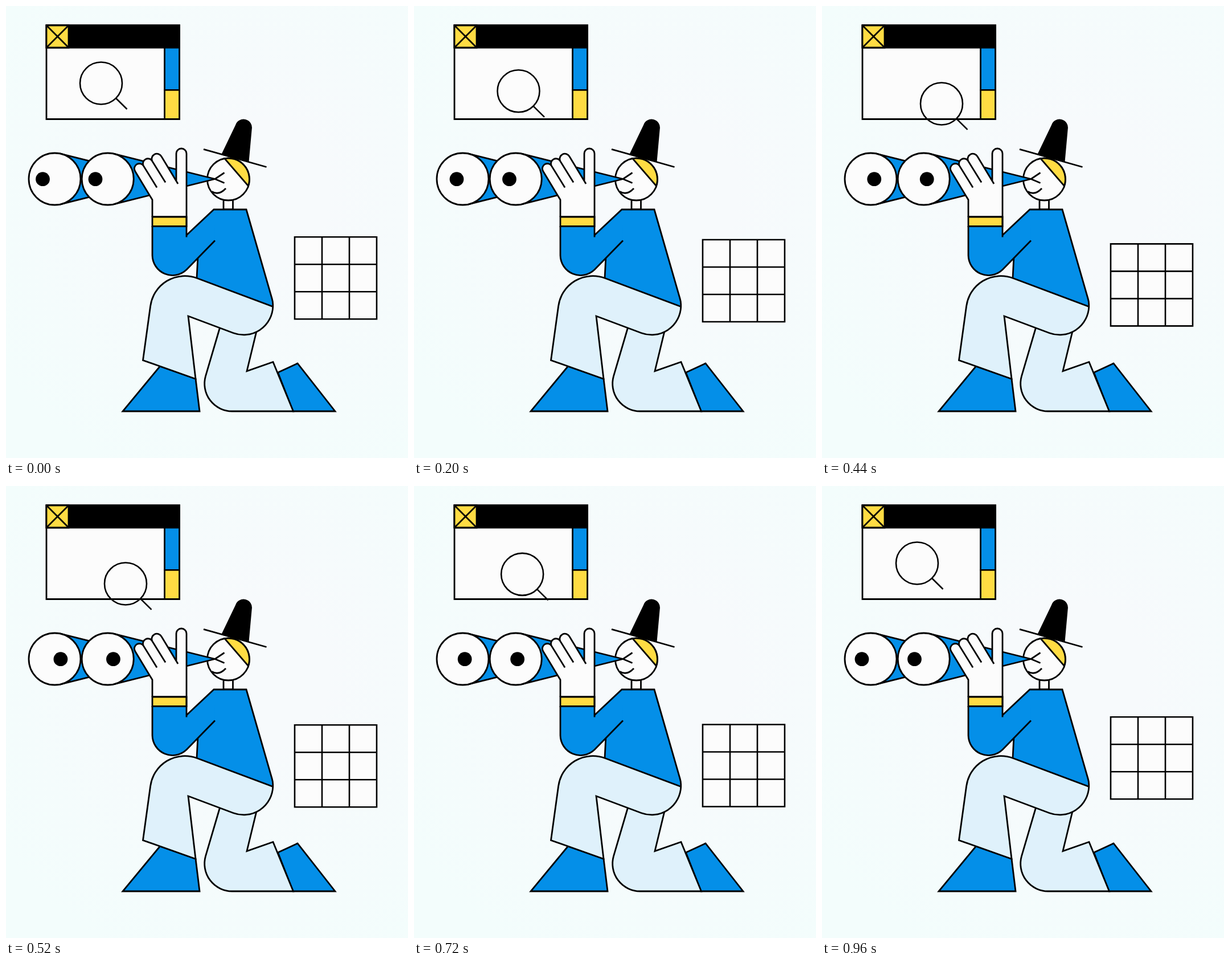
An HTML page for the animation above (1000 ms loop, 706 px wide and 793 px high).

```html
<!DOCTYPE html>
<html lang="en">
<head>
<meta charset="utf-8">
<title>Lookout</title>
<style>
  html, body { margin: 0; width: 100%; height: 100%; overflow: hidden; }
  body { background: radial-gradient(circle at 62% 42%, #f7fafc 20%, #f3fdfc 85%); }
  svg { display: block; width: 100%; height: 100%; }
  .ink { stroke: #000; stroke-width: 2.8; fill: none; }
  .white { fill: #fcfcfc; }
  .blue { fill: #048fe8; }
  .pale { fill: #dff1fb; }
  .yellow { fill: #ffdc43; }
  .flat { stroke: none; }
</style>
</head>
<body>
<svg viewBox="0 0 706 793" class="ink">
  <!-- browser window -->
  <path class="white" d="M71 34H304.5V198.5H71Z"/>
  <path fill="#000" d="M71 34H304.5V73H71Z"/>
  <path class="yellow" d="M71 34H110V73H71Z"/>
  <path d="M72 35L109 72M109 35L72 72"/>
  <path class="blue" d="M278.5 73H304.5V147.3H278.5Z"/>
  <path class="yellow" d="M278.5 147.3H304.5V198.5H278.5Z"/>
  <g id="lens" stroke-width="2.6">
    <circle cx="167" cy="135.5" r="37"/>
    <path d="M193.2 162L212.5 181"/>
  </g>

  <!-- grid -->
  <g id="grid" stroke-width="2.6">
    <path class="white" d="M507 405.3h144v144h-144Z"/>
    <path d="M555 405.3v144M603 405.3v144M507 453.3h144M507 501.3h144"/>
  </g>

  <!-- head and hat -->
  <path class="white" d="M382 330V357H398.5V330"/>
  <circle class="white" cx="390.5" cy="304" r="37"/>
  <path class="yellow" d="M384 267.6A37 37 0 0 1 425.5 315.7Z"/>
  <path d="M347 251.3L457.5 282.5"/>
  <path fill="#000" class="flat" d="M378 261L403 209A14.8 14.8 0 0 1 431.7 216L426.5 273.5Z"/>
  <path d="M361.5 325.5Q374 333 386 320"/>

  <!-- binoculars -->
  <path class="blue" d="M96.5 259.4L273.5 303.5L96.5 347.6Z"/>
  <circle class="white" cx="85.5" cy="303.5" r="45.5"/>
  <path class="blue" d="M190 259.4L367 303.5L190 347.6Z" stroke-linejoin="bevel"/>
  <circle class="white" cx="178.7" cy="303.5" r="45.5"/>
  <path d="M383.5 292.5L367 303.5L383.5 310.5"/>
  <g id="pupils" fill="#000" stroke="none">
    <circle cx="64.5" cy="303.7" r="12.4"/>
    <circle cx="157" cy="303.7" r="12.4"/>
  </g>

  <!-- back leg -->
  <path class="blue" d="M477.5 643L512 627L578 711H504Z"/>
  <path class="pale" d="M378 556L350.5 649.3A48.5 48.5 0 0 0 397 711H504.5L469 624.5L423 640.5L443 558Z"/>

  <!-- torso and arm -->
  <path class="blue" d="M365 357H422L467 513Q469.5 521 468.5 528L335 477L336.8 442L330 400Z" stroke="none"/>
  <path class="blue" d="M257 386.5H317V402L365 357L367 411.5L317.1 462.6A35.5 35.5 0 0 1 257 437.5Z" stroke="none"/>
  <path d="M367 411.5L317.1 462.6A35.5 35.5 0 0 1 257 437.5V386"/>
  <path d="M317 402L365 357H422L467 513Q469.5 521 468.5 528M336.8 442.5L335 477"/>

  <!-- hand -->
  <path class="white" d="M257 370V340L226.8 290A8.7 8.7 0 0 1 241.5 280.5A8.7 8.7 0 0 1 257 272.5A9 9 0 0 1 273 264L302 312L299 307V259A9 9 0 0 1 317 259V370Z" stroke-linejoin="bevel"/>
  <path d="M241.5 280.5L265 318.5M257 272.5L280 309.5"/>
  <path class="yellow" d="M257 370H317V386.5H257Z"/>
  <path d="M317 370V405.5"/>

  <!-- front leg -->
  <path class="blue" d="M270.5 632L205 711H340L333 654Z"/>
  <path class="pale" d="M240.5 621.5L253.6 526.5A61 61 0 0 1 335.4 477.5L468.8 527.5A51.5 51.5 0 0 1 399.4 573.7L320 544L333 654.3Z"/>
</svg>
<script>
  const LOOP = 1000, SLOT = 40, RATE = 30;
  const [lens, grid, pupils] = ['lens', 'grid', 'pupils'].map(id => document.getElementById(id));

  // Linear rise to 1 at `peak`, linear fall to 0 at `end`.
  const swing = (u, peak, end) =>
    u < peak ? u / peak : Math.max(0, (end - u) / (end - peak));

  const move = (el, x, y) => el.setAttribute('transform', `translate(${x} ${y})`);

  // A 30-step cycle shown in 40 ms slots; exact ties hold the earlier step.
  function stepAt(ms) {
    const slot = Math.floor((ms % LOOP) / SLOT + 1e-4);
    return Math.max(0, Math.ceil(slot * SLOT * RATE / LOOP - 1e-6) - 1);
  }

  function draw() {
    const u = stepAt(performance.now());
    const a = swing(u, 14, 28);
    move(lens, 46.3 * a, 38.7 * a);
    move(grid, 0, 17.7 * swing(u, 19, 27));
    move(pupils, 35.6 * swing(u, 17, 30), 0);
    requestAnimationFrame(draw);
  }
  draw();
</script>
</body>
</html>
```
